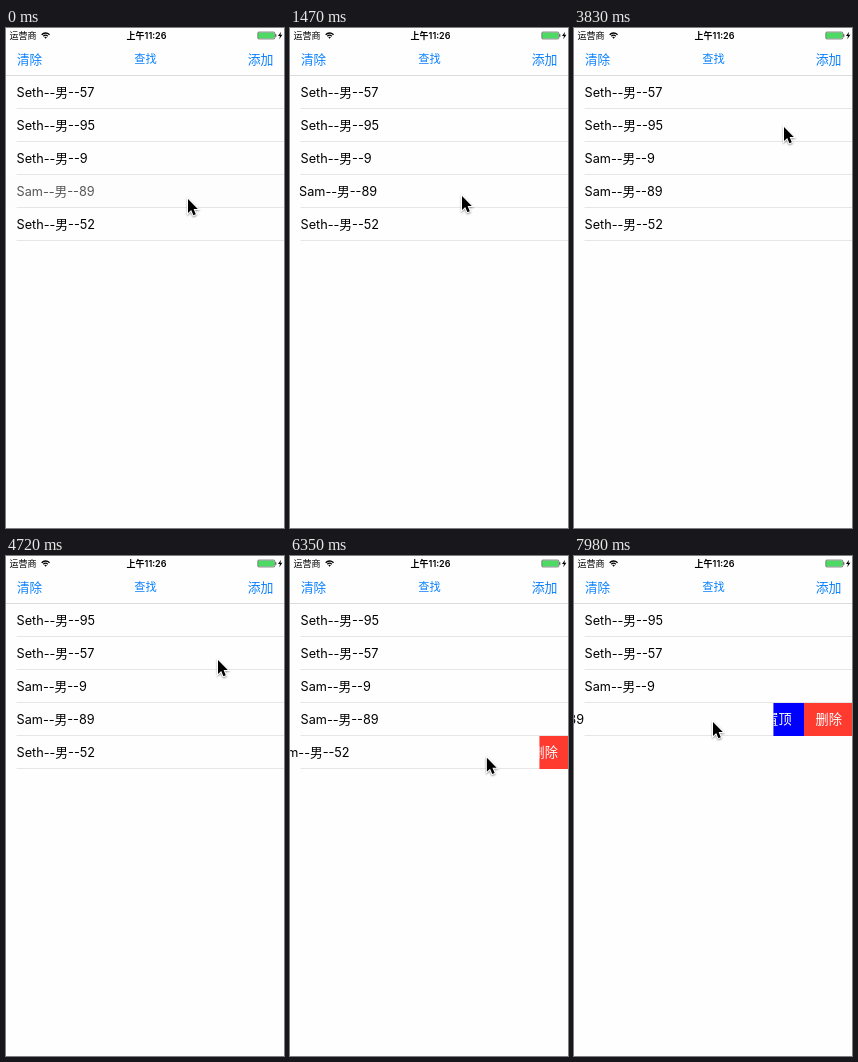
Animation of 278 by 500 pixels, one loop 8000 ms. Source, as an HTML page with a canvas:

```html
<!DOCTYPE html>
<html lang="zh-CN">
<head>
<meta charset="utf-8">
<title>列表</title>
<style>
html, body { margin: 0; width: 100%; height: 100%; overflow: hidden; background: #fefefe; }
canvas { display: block; width: 278px; height: 500px; }
</style>
</head>
<body>
<canvas id="stage"></canvas>
<script>
const W = 278, H = 500, LOOP = 8000, TICK = 147.7;
const ROW = 33, TOP = 48, INSET = 10.5, OPEN = 98, DRAG = 2.8, FADE = 4;
const BLUE = '#0a80ff', INK = '#000', PAPER = '#fefefe';
const FONT = 'Inter, "Noto Sans CJK SC", "Noto Sans CJK", sans-serif';

// All times below are in ticks.
const PIN = 32, DELETE = 48;
const TAPS = { 2: 21, 3: -2.6, 4: 37 };
const SWIPES = [
  { row: 3, start: 3, release: 7 },
  { row: 1, start: 27, end: PIN },
  { row: 4, start: 42 },
  { row: 3, start: 52 }
];
// Resting points of the pointer: time, x, y.
const STOPS = [
  [0, 182, 171], [3, 220, 171], [6, 150, 169], [10, 172, 168],
  [14, 161, 135], [21, 161, 135], [26, 210, 99], [29, 130, 99],
  [32, 212, 104], [37, 155, 208], [40, 155, 208], [42, 215, 202],
  [45, 145, 201], [47, 261, 199], [49, 261, 199], [52, 222, 166], [54, 139, 166]
];

const canvas = document.getElementById('stage');
const ctx = canvas.getContext('2d');
const dpr = window.devicePixelRatio || 1;
canvas.width = W * dpr;
canvas.height = H * dpr;

const clamp = v => Math.min(1, Math.max(0, v));
const mix = (a, b, k) => a + (b - a) * k;
const ease = v => { const k = clamp(v); return k * k * (3 - 2 * k); };

function swipeShift(row, t) {
  let shift = 0;
  for (const { row: r, start, release = Infinity, end = Infinity } of SWIPES) {
    if (r !== row || t < start || t >= end) continue;
    const spring = t > release ? Math.exp(-1.4 * (t - release)) : 1;
    shift = Math.max(shift, OPEN * ease((t - start) / DRAG) * spring);
  }
  return shift;
}

function pointerAt(t) {
  const i = Math.max(1, STOPS.findIndex(s => s[0] >= t));
  const [t0, x0, y0] = STOPS[i - 1], [t1, x1, y1] = STOPS[i];
  const k = ease((t - t0) / (t1 - t0));
  return [mix(x0, x1, k), mix(y0, y1, k)];
}

function box(x, y, w, h, color) {
  ctx.fillStyle = color;
  ctx.fillRect(x, y, w, h);
}

function text(str, x, y, size, color, align = 'left', weight = 400) {
  ctx.font = `${weight} ${size}px ${FONT}`;
  ctx.textAlign = align;
  ctx.fillStyle = color;
  ctx.fillText(str, x, y);
}

function shape(points, color) {
  ctx.beginPath();
  points.forEach(([x, y]) => ctx.lineTo(x, y));
  ctx.closePath();
  ctx.fillStyle = color;
  ctx.fill();
}

function wifi(x, y) {
  ctx.strokeStyle = INK;
  ctx.lineWidth = 1.3;
  for (const r of [3.1, 5.4]) {
    ctx.beginPath();
    ctx.arc(x, y, r, -Math.PI * .76, -Math.PI * .24);
    ctx.stroke();
  }
  shape([[x - 1.3, y - 1.2], [x, y - 1.7], [x + 1.3, y - 1.2], [x, y + .3]], INK);
}

function battery() {
  box(252, 4.5, 16.5, 6, '#4cd964');
  ctx.strokeStyle = '#444';
  ctx.lineWidth = .6;
  ctx.beginPath();
  ctx.roundRect(251.7, 4, 17.2, 7, 1.3);
  ctx.stroke();
  box(269.3, 6.2, 1, 2.6, '#444');
  shape([[275, 3.8], [272, 8], [274, 8], [273.2, 11.2], [276.4, 6.8], [274.4, 6.8]], INK);
}

function header() {
  text('运营商', 3.6, 11, 9, INK);
  wifi(39.6, 10.4);
  text('上午11:26', 140.5, 11, 9, INK, 'center', 600);
  battery();
  text('清除', 11, 35.8, 12.6, BLUE);
  text('查找', 139.5, 35.2, 11.2, BLUE, 'center');
  text('添加', 267.5, 35.8, 12.9, BLUE, 'right');
  box(0, 47, W, 1, '#dcdcdc');
}

function buttons(y, h, shift) {
  ctx.save();
  ctx.beginPath();
  ctx.rect(W - shift, y, shift, h);
  ctx.clip();
  box(180, y, 50, h, '#0000ff');
  box(230, y, 48, h, '#ff3b30');
  const base = y + h / 2 + 4.8;
  text('置顶', 204.5, base, 13.2, '#fff', 'center');
  text('删除', 254.7, base, 13.2, '#fff', 'center');
  ctx.restore();
}

function row(i, age, t) {
  const y = TOP + ROW * i;
  const shift = swipeShift(i, t);
  const shrunk = i === 4 && t >= DELETE;
  const label = name => text(`${name}--男--${age}`, INSET - shift, y + 20.6, 12.7, INK);
  box(INSET, y + ROW - 1, (shrunk ? W - OPEN : W) - INSET, 1, '#e6e6e6');

  // A tapped row lights up, then cross-fades to its new name.
  const fade = clamp((t - TAPS[i]) / FADE || 0);
  ctx.globalAlpha = clamp(1 - fade * 1.5);
  if (t >= TAPS[i]) box(0, y, W, ROW - 1, '#d9d9d9');
  label('Seth');
  ctx.globalAlpha = fade;
  label('Sam');
  ctx.globalAlpha = 1;

  if (shift > 4) buttons(y, shrunk ? 10 : ROW, shift);
}

function pointer(x, y) {
  const arrow = [[0, 0], [0, 14], [3.2, 11], [5.4, 16.2], [7.8, 15.2], [5.6, 10], [9.8, 10]];
  ctx.save();
  ctx.translate(x, y);
  ctx.shadowColor = 'rgba(0,0,0,.35)';
  ctx.shadowBlur = 2 * dpr;
  ctx.shadowOffsetY = dpr;
  shape(arrow, '#fff');
  ctx.strokeStyle = '#fff';
  ctx.lineWidth = 2;
  ctx.stroke();
  ctx.shadowColor = 'transparent';
  shape(arrow, INK);
  ctx.restore();
}

function draw(ms) {
  // The screen refreshes in steps rather than continuously.
  const t = Math.floor((ms % LOOP + 12) / TICK);
  ctx.setTransform(dpr, 0, 0, dpr, 0, 0);
  box(0, 0, W, H, PAPER);
  header();
  const ages = t < PIN ? [57, 95, 9, 89, 52] : [95, 57, 9, 89, 52];
  if (t > DELETE) ages.pop();
  ages.forEach((age, i) => row(i, age, t));
  pointer(...pointerAt(t));
}

const start = performance.now();
function loop() {
  draw(performance.now() - start);
  requestAnimationFrame(loop);
}
loop();
</script>
</body>
</html>
```
